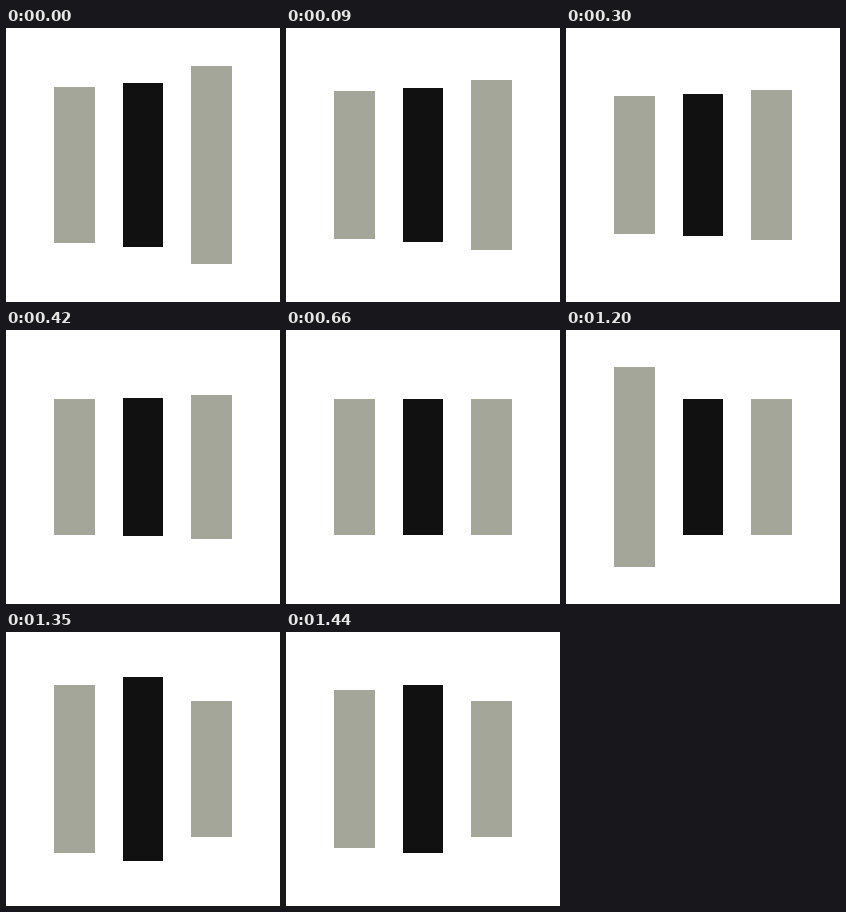
An HTML page for the animation above (1.47 s loop, 274 by 274 pixels).

```html
<!DOCTYPE html>
<html lang="en">
<head>
<meta charset="utf-8">
<title>Pulsing bars</title>
<style>
  html, body { margin: 0; width: 100%; height: 100%; overflow: hidden; background: #fff; }
  .bar { position: absolute; top: 69px; height: 136px; background: #a3a698; }
  .left { left: 48px; width: 41px; }
  .middle { left: 117px; width: 40px; background: #111; }
  .right { left: 185px; width: 41px; }
</style>
</head>
<body>
<div class="bar left"></div>
<div class="bar middle"></div>
<div class="bar right"></div>
<script>
  const SIZE = 274, LOOP = 1470, TICK = 30;
  const REST = SIZE * 0.25;

  // Each bar springs out by `reach`, then settles during half a loop.
  const bars = [
    { name: 'left', reach: SIZE * 0.15, lead: LOOP * 0.2 },
    { name: 'middle', reach: SIZE * 0.1125, lead: LOOP * 0.1 },
    { name: 'right', reach: SIZE * 0.1125, lead: 0 }
  ];
  for (const bar of bars) bar.el = document.querySelector('.' + bar.name);

  // cubic-bezier(0, 0.5, 0.5, 1)
  function ease(x) {
    if (x >= 1) return 1;
    let lo = 0, hi = 1;
    for (let i = 0; i < 30; i++) {
      const s = (lo + hi) / 2;
      if (1.5 * s * s - 0.5 * s ** 3 < x) lo = s; else hi = s;
    }
    return 1.5 * lo - 0.5 * lo ** 3;
  }

  function draw(time) {
    const t = Math.floor((time % LOOP) / TICK) * TICK;
    for (const { el, reach, lead } of bars) {
      const p = ((t + lead) % LOOP) / (LOOP / 2);
      const edge = REST - reach * (1 - ease(p));
      // Only rows that are almost fully covered are painted.
      const top = Math.ceil(edge - 0.1);
      el.style.top = top + 'px';
      el.style.height = SIZE - 2 * top + 'px';
    }
  }

  const start = performance.now();
  function frame() {
    draw(performance.now() - start);
    requestAnimationFrame(frame);
  }
  frame();
</script>
</body>
</html>
```
